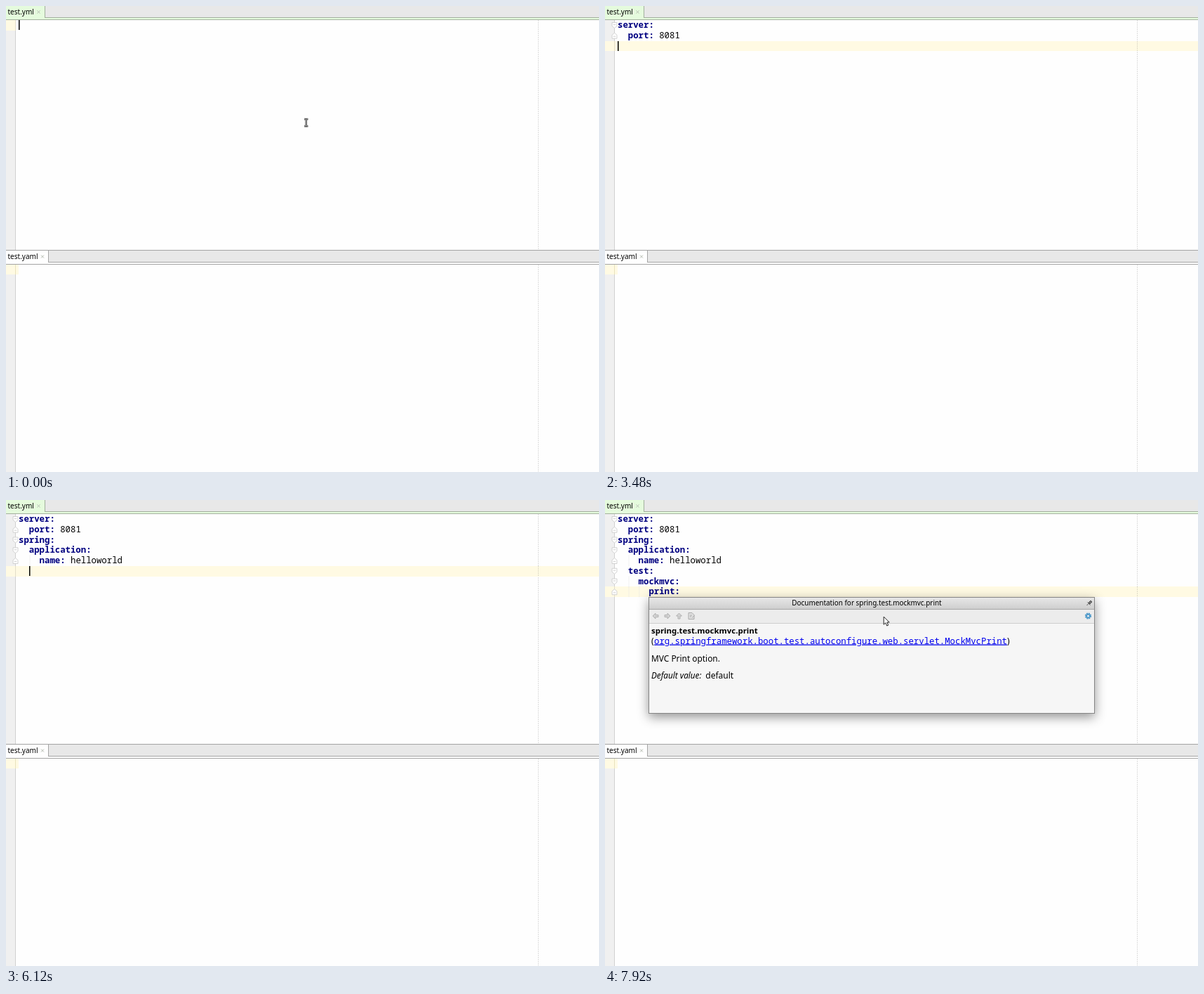
Animation, 845 px wide and 663 px high, one loop 8 s. Source, as an HTML page:

```html
<!DOCTYPE html>
<html lang="en">
<head>
<meta charset="utf-8">
<title>YAML completion</title>
<style>
  html, body { margin: 0; width: 100%; height: 100%; overflow: hidden; background: #fefefe; }
  svg { display: block; width: 845px; height: 663px; }
  text { white-space: pre; }
  .mono { font: 12.33px "Noto Sans Mono", monospace; }
  .ui { font-family: "Noto Sans", sans-serif; }
  .key { font-weight: 700; fill: #000080; }
  .hit { fill: #c454cf; }
  .link { fill: #0000ee; text-decoration: underline; }
  .shadow { filter: drop-shadow(0 5px 8px rgba(0, 0, 0, .42)); }
</style>
</head>
<body>
<svg id="stage" viewBox="0 0 845 663" xmlns="http://www.w3.org/2000/svg">
  <defs>
    <linearGradient id="bar" x2="0" y2="1">
      <stop stop-color="#e9e9e9"/><stop offset="1" stop-color="#cecece"/>
    </linearGradient>
  </defs>
  <g id="back"></g>
  <g id="live"></g>
</svg>
<script>
const LOOP = 8000, CW = 7.4, LH = 14.75, LEFT = 18, TOP = 20;
const back = document.getElementById('back');
const live = document.getElementById('live');

const rect = (x, y, w, h, fill, extra = '') =>
  `<rect x="${x}" y="${y}" width="${w}" height="${h}" fill="${fill}" ${extra}/>`;
const path = (d, stroke, fill = 'none', extra = '') =>
  `<path d="${d}" stroke="${stroke}" fill="${fill}" ${extra}/>`;
const mono = (x, y, s, fill = '#000', extra = '') =>
  `<text class="mono" x="${x}" y="${y}" fill="${fill}" ${extra}>${s}</text>`;
const ui = (x, y, size, s, extra = '') =>
  `<text class="ui" x="${x}" y="${y}" font-size="${size}" ${extra}>${s}</text>`;
const rowY = i => Math.round(TOP + i * LH);

// ---- static editor panes ----
function pane(y, name, tabW, closeX, tabFill, line) {
  return rect(0, y, 845, 17, '#e8e8e8') +
    rect(0, y, tabW, 19, tabFill) +
    rect(tabW, y, 1, 17, line) +
    rect(tabW, y + 16, 845 - tabW, 1, line) +
    rect(0, y + 17, 845, 2, tabFill) +
    rect(0, y + 19, 845, 1, line) +
    ui(2.5, y + 12, 10, name) +
    path(`M${closeX - 2} ${y + 6.5}l4 4m0 -4l-4 4`, '#b4bab0') +
    rect(0, y + 20, 13, 327, '#f0f0f0') +
    rect(13, y + 20, 1, 327, '#d0d0d0') +
    path(`M758.5 ${y + 20}V${y + 347}`, '#dcdcdc', 'none', 'stroke-dasharray="2 1"');
}
back.innerHTML = rect(0, 0, 845, 663, '#fefefe') +
  pane(0, 'test.yml', 55, 46.5, '#e5fbdd', '#a3b09e') +
  pane(348, 'test.yaml', 60, 52, '#fefefe', '#a4a4a4') +
  rect(0, 347, 845, 1, '#a4a4a4') +
  rect(0, 368, 18, 14, '#fffae3') + rect(13, 368, 1, 14, '#e8e2bd');

// ---- completion popups: [text, type]; [..] marks the matched letters ----
const moveHint = ['Ctrl+Down and Ctrl+Up will move caret down and up in the editor', 8.35, 262];
const dotHint = ['Press Ctrl+Period to choose the selected (or first) suggestion and insert a dot afterwards', 8.48, 355];
const popups = {
  ports: { x: 5, y: 35, w: 374, icon: true, hint: dotHint, rows: [
    ['server.[po]rt (Server HTTP port)', 'Integer'],
    ['spring.redis.[po]rt=6379 (Redis server…', 'Integer'],
    ['spring.mail.[po]rt (SMTP server port)', 'Integer'],
    ['spring.data.mongodb.[po]rt (Mongo serv…', 'Integer'],
    ['spring.rabbitmq.[po]rt=5672 (RabbitMQ …', 'Integer']] },
  port: { x: 5, y: 35, w: 374, icon: true, hint: moveHint, rows: [
    ['server.[port] (Server HTTP port)', 'Integer']] },
  names: { x: 5, y: 65, w: 374, icon: true, hint: dotHint, rows: [
    ['spring.application.[na]me (Application n…', 'String'],
    ['server.session.cookie.[na]me (Session co…', 'String'],
    ['spring.batch.job.[na]mes= (Comma-separat…', 'String'],
    ['spring.config.[na]me=application (Config…', 'String'],
    ['spring.couchbase.bucket.[na]me=default (…', 'String']] },
  profiles: { x: 19, y: 109, w: 375, hint: dotHint, rows: [
    ['[p]rofiles.include (Uncondition…', 'List&lt;String>'],
    ['[p]rofiles.active (Comma-separa…', 'List&lt;String>'],
    ['[p]id.file (Location of the PID…', 'String'],
    ['[p]id.fail-on-write-error=false…', 'Boolean'],
    ['jackson.[p]roperty-naming-strat…', 'String']] },
  include: { x: 19, y: 109, w: 375, hint: moveHint, rows: [
    ['[pr]ofiles.[i]nclude (Unconditionall…', 'List&lt;String>']] },
  print: { x: 19, y: 109, w: 440, hint: moveHint, rows: [
    ['test.mockmvc.[print]=default (MVC Print opt…', 'MockMvcPrint']] }
};

function popup({ x, y, w, icon, hint, rows }) {
  const many = rows.length > 1, listH = many ? 72 : 16, foot = y + listH;
  let out = rect(x, y, w, listH + 12, '#ebf4fe', 'class="shadow"');
  out += rect(x, y, w - (many ? 8 : 0), 16, '#a0b6c6');
  rows.forEach(([label, type], i) => {
    const base = y + 12.2 + i * 16.1, dim = i ? '#b6bbc0' : '#5d666d';
    const [head, tail] = label.split(' (');
    if (icon) {
      out += `<circle cx="${x + 7}" cy="${base - 4.2}" r="4.4" fill="#dccdf2" stroke="#b9a4dc" stroke-width=".6"/>` +
        ui(x + 4.8, base - 2, 7, 'p', 'fill="#7a55b5"');
    }
    out += mono(x + 13.5 + (icon ? 0 : .5), base,
      head.replace(/\[(.+?)\]/g, '<tspan class="hit">$1</tspan>') +
      (tail ? `<tspan fill="${dim}"> (${tail}</tspan>` : ''), '#555d64');
    out += mono(x + w - (many && i ? 14 : 5), base, type, '#555d64', 'text-anchor="end"');
  });
  if (many) {
    out += rect(x + w - 8, y, 8, listH, '#eef1f4') + rect(x + w - 7, y + 15, 7, 21, '#cbcdd0');
  }
  const [text, size, linkX] = hint;
  out += rect(x, foot, w, 12, '#ebebeb') + ui(x + .5, foot + 9, size, text) +
    ui(x + linkX - (many ? .5 : 0), foot + 9, 8.5, '>>', 'class="ui link"'.replace('class="ui link"', 'fill="#0000ee" text-decoration="underline"'));
  if (many) {
    out += rect(x + w - 9, foot + 1.5, 8, 9, '#d9e8f5') + ui(x + w - 8, foot + 9, 8, 'π', 'fill="#3b78ad"');
  }
  return out + rect(x - .5, y + .5, w, listH + 11.5, 'none', 'stroke="#a9adb1" stroke-width=".8"');
}

// ---- documentation window ----
function docs() {
  const arrow = (x, turn) => path('M-4 0L0 -4V-1.5H4V1.5H0V4Z', '#b2b2b2', '#d2d2d2',
    `transform="translate(${x} 165) rotate(${turn})"`);
  return rect(62, 138, 636, 166, '#f6f6f6', 'class="shadow"') +
    rect(62, 138, 636, 17, 'url(#bar)') + rect(62, 155, 636, 1, '#a8a8a8') +
    rect(62, 156, 636, 19, '#ececec') + rect(62, 175, 636, 1, '#cfcfcf') +
    rect(62.5, 138.5, 635, 165, 'none', 'stroke="#858585"') +
    ui(373, 149.5, 9.93, 'Documentation for spring.test.mockmvc.print', 'text-anchor="middle"') +
    path('M686.5 150l2.5 -2.5m-1.5 -2l4 4m-2.5 -3.5l3 -3l2 2l-3 3z', '#555', '#777') +
    arrow(72, 0) + arrow(89, 180) + arrow(105.5, 90) +
    path('M119 160.5h5l3 3v6h-8zM121 164h3m-3 2h2m1 1.5l3.5 -3', '#aaa', '#e0e0e0') +
    `<circle cx="688.5" cy="165" r="3.8" fill="none" stroke="#4a97c9" stroke-width="1.6" stroke-dasharray="2 .98"/>` +
    `<circle cx="688.5" cy="165" r="2.4" fill="none" stroke="#4a97c9" stroke-width="1.8"/>` +
    ui(66, 190, 11.45, 'spring.test.mockmvc.print', 'font-weight="700"') +
    ui(66, 204.5, 12, '(') +
    `<text class="mono link" x="70" y="204.5">org.springframework.boot.test.autoconfigure.web.servlet.MockMvcPrint</text>` +
    ui(573, 204.5, 12, ')') +
    ui(66, 229.5, 11.9, 'MVC Print option.') +
    ui(66, 253.5, 11.7, 'Default value:', 'font-style="italic"') +
    ui(143.3, 253.5, 12, 'default');
}

// ---- timeline: every step overrides part of the previous state ----
const steps = [];
const at = (t, change) => steps.push({ ...steps[steps.length - 1], ...change, t });
const type = (t, word, gap = 120) => [...word].forEach((c, i) =>
  at(t + i * gap, { code: steps[steps.length - 1].code + c }));

at(0, { code: '', folds: '', pop: '', idle: true, caret: true, docs: false, pointer: false });
at(240, { code: 'p', idle: false });
type(360, 'o');
at(480, { pop: 'ports' });
type(600, 'r');
at(720, { pop: 'port' });
type(840, 't');
at(1320, { code: 'server:\n  port: ', pop: '' });
at(1440, { folds: 'v^' });
type(1680, '8081', 240);
at(3120, { caret: false });
at(3480, { code: 'server:\n  port: 8081\n', caret: true });
type(3600, 'n');
at(3720, { pop: 'names' });
type(3840, 'ame');
at(4200, { code: 'server:\n  port: 8081\nspring:\n  application:\n    name: ', pop: '' });
at(4320, { folds: 'v^vv^' });
steps.pop();
type(4320, 'hell');
steps.slice(-4).forEach(s => s.folds = 'v^vv^');
type(4920, 'ow');
type(5280, 'orld');
const named = steps[steps.length - 1].code;
at(6000, { code: named + '\n    ' });
at(6120, { code: named + '\n  ' });
type(6360, 'p');
at(6480, { pop: 'profiles' });
type(6600, 'r');
type(6720, 'i');
steps[steps.length - 1].pop = 'include';
type(6840, 'nt');
at(7080, { pop: 'print' });
steps.slice(-3, -1).forEach(s => s.pop = 'include');
at(7200, { code: named + '\n  test:\n    mockmvc:\n      print: ', pop: '' });
at(7320, { folds: 'v^vv^vv^' });
at(7800, { docs: true, caret: false });
at(7920, { pointer: true });

function draw(s) {
  const lines = s.code.split('\n'), row = lines.length - 1, y = rowY(row);
  let out = rect(0, y, s.idle ? 14 : 845, rowY(row + 1) - y, '#fffae3') +
    rect(13, y, 1, rowY(row + 1) - y, '#e3deca');
  if (!s.idle) out += path(`M758.5 ${y}v15`, '#dedac6', 'none', 'stroke-dasharray="2 1"');

  lines.forEach((line, i) => {
    const [, pad, key, rest] = line.match(/^(\s*)(\w+:)?(.*)$/);
    const depth = pad.length;
    for (let d = 2; d < depth; d += 2) {
      if (key) out += path(`M${LEFT + d * CW + 1.2} ${rowY(i)}v15`, '#e4e4e4', 'none', 'stroke-dasharray="1 1"');
    }
    out += mono(LEFT + depth * CW, 31 + i * LH,
      (key ? `<tspan class="key">${key}</tspan>` : '') + rest);
  });

  [...s.folds].forEach((f, i) => {
    const flip = f === '^' ? -1 : 1;
    out += path('M-3.5 -4H3.5V1L0 4L-3.5 1ZM-1.7 -1H1.7', '#cfcfcf', '#fdfdfd',
      `stroke-width=".9" transform="translate(13.5 ${27.5 + i * LH}) scale(1 ${flip})"`);
  });

  if (s.caret) {
    out += rect(Math.round(LEFT + lines[row].length * CW), y, 1.5, 14, '#000');
  }
  if (s.idle) {
    const beam = 'M425 161h2l.7 .7l.7 -.7h2M425 171h2l.7 -.7l.7 .7h2M427.7 161.7v8.6';
    out += path(beam, '#333', 'none', 'stroke-width="2.4"') + path(beam, '#eee', 'none', 'stroke-width=".7"');
  }
  if (s.pop) out += popup(popups[s.pop]);
  if (s.docs) out += docs();
  if (s.pointer) {
    out += path('M397.2 166v11.2l2.6 -2.4l1.9 4.2l2 -.9l-1.9 -4.1h3.4z', '#222', '#fff');
  }
  live.innerHTML = out;
}

let shown;
function update(now) {
  const t = now % LOOP;
  const state = steps.reduce((a, s) => s.t <= t ? s : a);
  if (state !== shown) draw(shown = state);
}

const start = performance.now();
function tick() {
  update(performance.now() - start);
  requestAnimationFrame(tick);
}
update(0);
requestAnimationFrame(tick);
</script>
</body>
</html>
```
